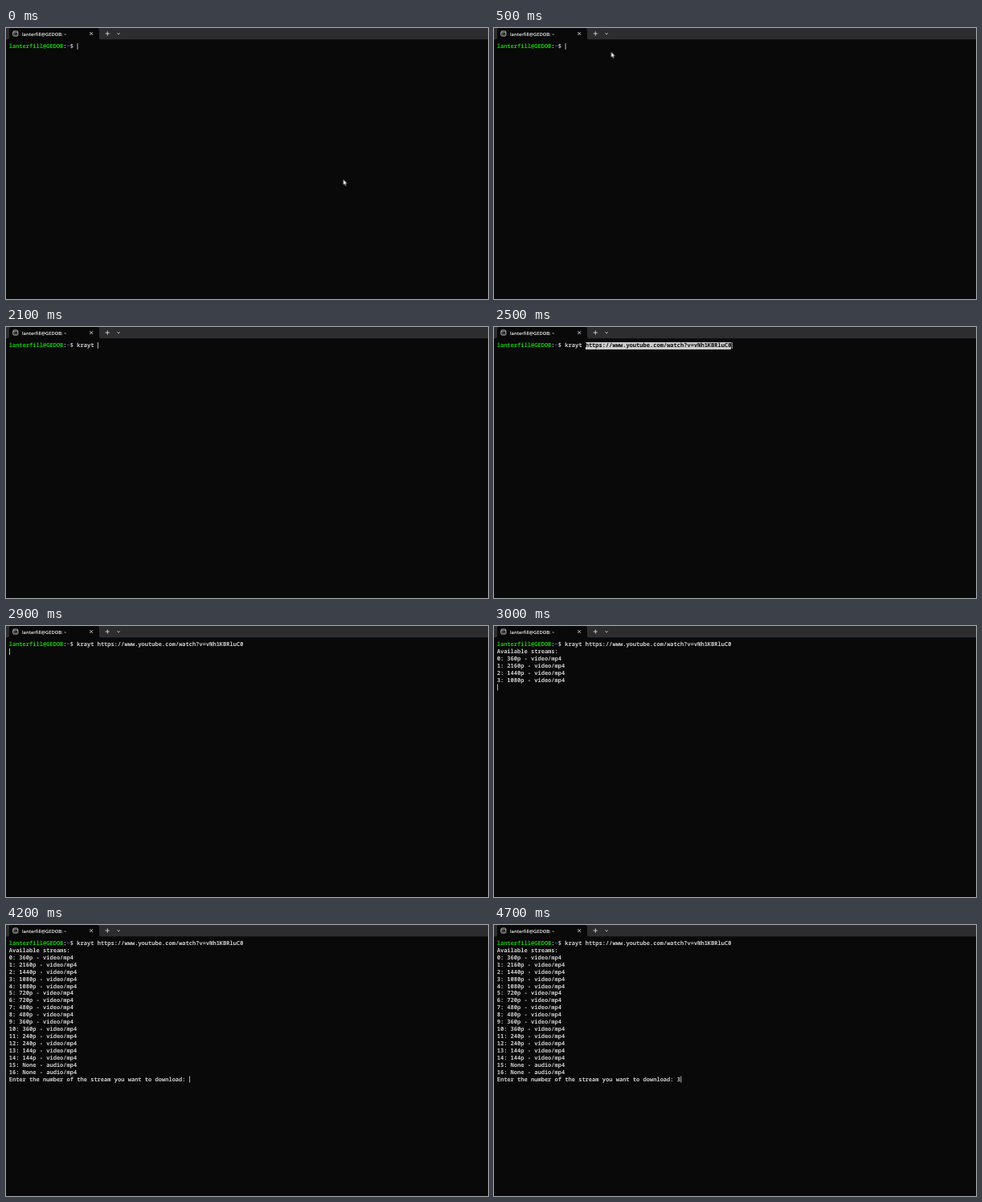
Animation of 600 by 338 pixels, one loop 5 s. Source, as an HTML page:

```html
<!DOCTYPE html>
<html lang="en">
<head>
<meta charset="utf-8">
<title>Terminal</title>
<style>
  html, body { margin: 0; width: 100%; height: 100%; overflow: hidden; background: #090909; }
  #stage {
    --row: 8.92px;
    --loop: 5s step-end infinite;
    position: relative; width: 600px; height: 338px; overflow: hidden;
    background: #090909; text-rendering: geometricPrecision;
  }
  #bar, #mouse { position: absolute; left: 0; top: 0; }
  #title {
    position: absolute; left: 20px; top: 2.5px;
    font: 600 5.8px/10px "Open Sans", "Noto Sans", sans-serif; color: #f4f4f4; white-space: pre;
  }
  #term {
    position: absolute; left: 3.7px; top: 19px;
    font: 600 7.055px/var(--row) "Noto Sans Mono", monospace;
    font-variant-ligatures: none; color: #ccc; white-space: pre;
  }
  .line { height: var(--row); display: flex; }
  .user { color: #16c60c; }
  .path { color: #3b78ff; }
  .cmd { overflow: hidden; width: 0; animation: type var(--loop); }
  .url { display: inline-block; height: var(--row); animation: select var(--loop); }
  .out { overflow: hidden; height: 0; animation: print var(--loop); }
  .answer { opacity: 0; animation: answer var(--loop); }
  .caret {
    position: absolute; left: 0; top: -.2px; width: 1px; height: 8.2px; background: #b4b4b4;
    animation: caret var(--loop);
  }
  #mouse { animation: mouse var(--loop); }

  @keyframes type {
    0% { width: 0; }
    34% { width: 1ch; }
    36% { width: 2ch; }
    38% { width: 3ch; }
    40% { width: 4ch; }
    42% { width: 6ch; }
    50%, 100% { width: 49ch; }
  }
  @keyframes select {
    0%, 58%, 100% { background: transparent; color: #ccc; }
    50% { background: #ccc; color: #090909; }
  }
  @keyframes print {
    0% { height: 0; }
    60% { height: calc(5 * var(--row)); }
    62%, 100% { height: calc(19 * var(--row)); }
  }
  @keyframes answer {
    0% { opacity: 0; }
    94%, 100% { opacity: 1; }
  }
  @keyframes caret {
    0% { transform: translate(20ch, 0); }
    34% { transform: translate(21ch, 0); }
    36% { transform: translate(22ch, 0); }
    38% { transform: translate(23ch, 0); }
    40% { transform: translate(24ch, 0); }
    42% { transform: translate(26ch, 0); }
    50% { transform: translate(69ch, 0); }
    58% { transform: translate(0, var(--row)); }
    60% { transform: translate(0, calc(6 * var(--row))); }
    62% { transform: translate(53ch, calc(19 * var(--row))); }
    94%, 100% { transform: translate(54ch, calc(19 * var(--row))); }
  }
  @keyframes mouse {
    0% { transform: translate(419.5px, 188.2px); }
    2% { transform: translate(391px, 171.7px); }
    4% { transform: translate(323px, 132.3px); }
    6% { transform: translate(242px, 85.2px); }
    8% { transform: translate(174px, 45.7px); }
    10% { transform: translate(145.5px, 29.2px); opacity: 1; }
    34%, 100% { transform: translate(145.5px, 29.2px); opacity: 0; }
  }
</style>
</head>
<body>
<div id="stage">
  <svg id="bar" width="600" height="15" fill="none" stroke="#e6e6e6" stroke-width=".8">
    <rect width="600" height="14.3" fill="#2d2c2f" stroke="none"/>
    <path d="M2 14.3q2 0 2-2V3q0-3 3-3H113q3 0 3 3v9.3q0 2 2 2v.7H2z" fill="#090909" stroke="none"/>
    <rect x="8.8" y="4" width="6" height="6" rx="1.2"/>
    <path d="M8.8 5.8h6M10.3 7l.9.8-.9.8M12 8.6h1.4" stroke-width=".6"/>
    <path d="M104.2 5l4 4m0-4l-4 4M123.7 7h5.2M126.3 4.4v5.2M138.4 6.3l1.7 1.6 1.7-1.6"/>
  </svg>
  <div id="title">lanterfill@GEDOB: ~</div>
  <div id="term"><div class="line"><span class="user">lanterfill@GEDOB</span>:<span class="path">~</span><span>$ </span><div class="cmd">krayt <span class="url">https://www.youtube.com/watch?v=vNh1KBRluC0</span></div></div><div class="out">Available streams:
0: 360p - video/mp4
1: 2160p - video/mp4
2: 1440p - video/mp4
3: 1080p - video/mp4
4: 1080p - video/mp4
5: 720p - video/mp4
6: 720p - video/mp4
7: 480p - video/mp4
8: 480p - video/mp4
9: 360p - video/mp4
10: 360p - video/mp4
11: 240p - video/mp4
12: 240p - video/mp4
13: 144p - video/mp4
14: 144p - video/mp4
15: None - audio/mp4
16: None - audio/mp4
Enter the number of the stream you want to download: <span class="answer">3</span></div><i class="caret"></i></div>
  <svg id="mouse" width="8" height="11">
    <path d="M.3.4V7.6L1.9 6.2 3 8.7 4.2 8.2 3.1 5.8H5.3z" fill="#fff" stroke="#000" stroke-width=".4"/>
  </svg>
</div>
</body>
</html>
```
